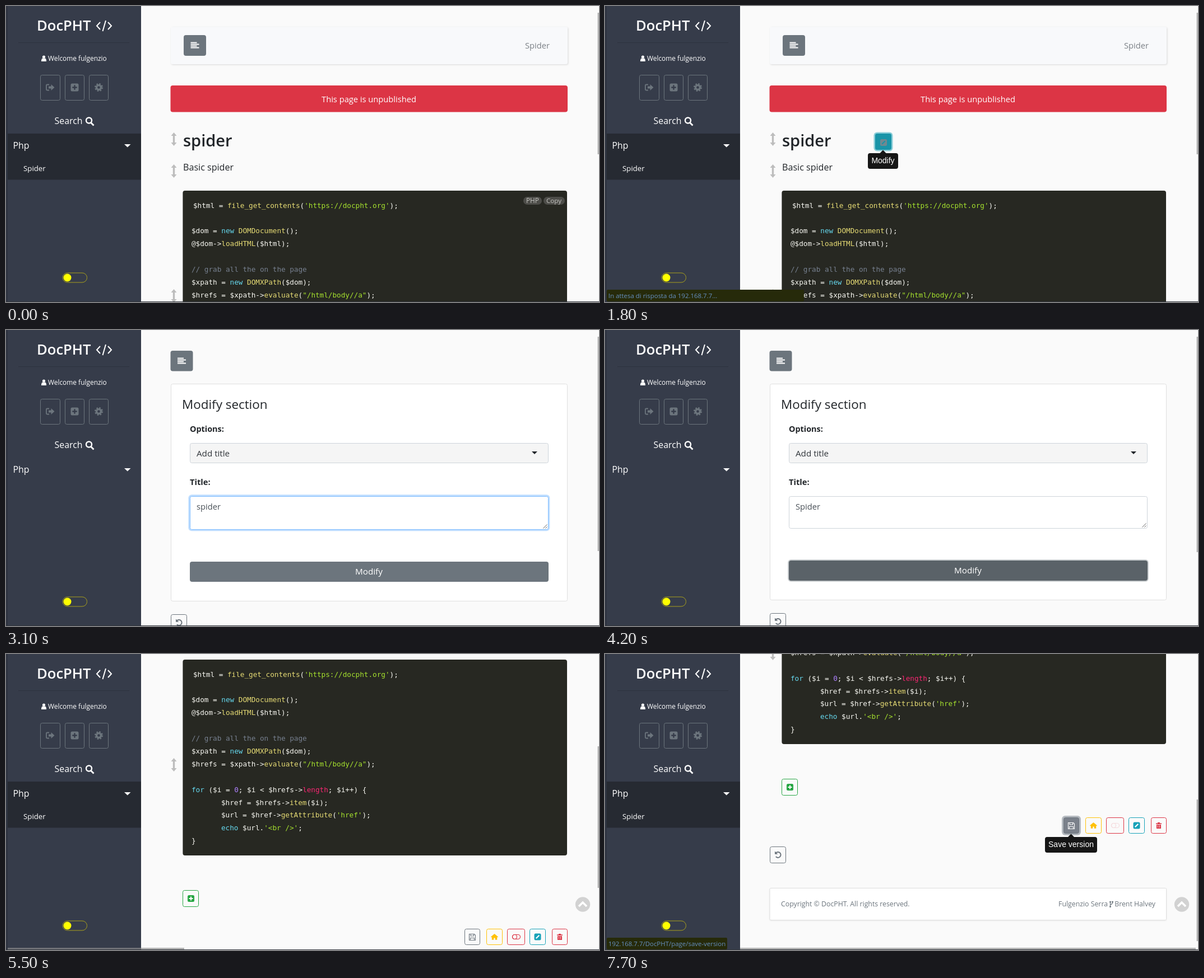
An HTML page that plays this animation: 1058 px wide and 529 px high, repeating every 8 s.

```html
<!DOCTYPE html>
<html lang="en">
<head>
<meta charset="utf-8">
<style>
html, body { margin: 0; width: 100%; height: 100%; overflow: hidden; background: #fafafa; }
svg { display: block; font-family: "Open Sans", "Noto Sans", sans-serif; font-weight: 450; }
text { white-space: pre; }
.mono { font: 12.67px "DejaVu Sans Mono", monospace; fill: #f8f8f2; }
.tip { font: 14px "Liberation Sans", Arial, sans-serif; fill: #fff; text-anchor: middle; }
.f { fill: #e6db74 } .s { fill: #a6e22e } .k { fill: #66d9ef }
.c { fill: #778090 } .n { fill: #ae81ff } .p { fill: #f92672 }
</style>
</head>
<body>
<svg id="stage" width="1058" height="529" viewBox="0 0 1058 529"></svg>
<script>
const GRAY = '#6c757d', RED = '#dc3545', TEAL = '#17a2b8', GREEN = '#28a745', SIDE = '#363c4a', INK = '#212529';

// Drawing helpers that return markup
const text = (x, y, size, fill, str, more = '') =>
  `<text x="${x}" y="${y}" font-size="${size}" fill="${fill}" ${more}>${str}</text>`;
const rect = (x, y, w, h, fill, r = 0, more = '') =>
  `<rect x="${x}" y="${y}" width="${w}" height="${h}" rx="${r}" fill="${fill}" ${more}/>`;
const frame = (x, y, w, h, stroke, fill = 'none', more = '') =>
  rect(x + .5, y + .5, w - 1, h - 1, fill, 3, `stroke="${stroke}" ${more}`);
const fill = (d, color, more = '') => `<path d="${d}" fill="${color}" ${more}/>`;
const line = (d, color, w = 2, more = '') =>
  `<path d="${d}" fill="none" stroke="${color}" stroke-width="${w}" ${more}/>`;
const group = (id, body, more = '') => `<g id="${id}" ${more}>${body}</g>`;

// Icons
const menuButton = (x, y, h) => rect(x, y, 40, h, GRAY, 4) +
  [11, 15, 11, 15].map((w, i) => rect(x + 12.5, y + 12.5 + 3 * i, w, 2, '#fff')).join('');
const plus = (x, y, s, color, hole) => rect(x, y, s, s, color, 2.5) +
  line(`M${x + s * .2} ${y + s / 2}h${s * .6}M${x + s / 2} ${y + s * .2}v${s * .6}`, hole, s * .17);
const pen = (x, y, color, hole) => rect(x, y, 12, 12, color, 2.5) +
  line(`M${x + 3.2} ${y + 8.8}l5.6-5.6`, hole, 2.2);
const arrows = y =>
  fill(`M299.5 ${y}l5 6h-3.3v12h3.3l-5 6-5-6h3.3v-12h-3.3z`, '#bdbdbd');
const undo = y => frame(294, y, 29, 30, GRAY, '#fafafa') +
  line(`M304.5 ${y + 12}a5 5 0 1 1 .3 6.2`, GRAY, 2) + fill(`M303 ${y + 8.5}v5.3h5.3z`, GRAY);
const tip = (x, y, w, str) => rect(x, y, w, 28, '#161616', 4) +
  fill(`M${x + w / 2 - 5.5} ${y}l5.5-5.5 5.5 5.5z`, '#161616') +
  `<text class="tip" x="${x + w / 2}" y="${y + 18}">${str}</text>`;

const code = [
  [334, `$html = <f>file_get_contents</f>(<s>'https://docpht.org'</s>);`],
  [],
  [331, `$dom = <k>new</k> <f>DOMDocument</f>();`],
  [331, `@$dom-&gt;<f>loadHTML</f>($html);`],
  [],
  [331, `<c>// grab all the on the page</c>`],
  [331, `$xpath = <k>new</k> <f>DOMXPath</f>($dom);`],
  [331, `$hrefs = $xpath-&gt;<f>evaluate</f>(<s>"/html/body//a"</s>);`],
  [],
  [331, `<k>for</k> ($i = <n>0</n>; $i &lt; $hrefs-&gt;<p>length</p>; $i++) {`],
  [384, `$href = $hrefs-&gt;<f>item</f>($i);`],
  [384, `$url = $href-&gt;<f>getAttribute</f>(<s>'href'</s>);`],
  [384, `<k>echo</k> $url.<s>'&lt;br /&gt;'</s>;`],
  [331, `}`],
].map(([x, str], i) => !str ? '' : `<text class="mono" x="${x}" y="${360.5 + 22.9 * i}">` +
  str.replace(/<(\w)>/g, '<tspan class="$1">').replace(/<\/\w>/g, '</tspan>') + '</text>').join('');

const toolbar = rect(923, 341, 33, 14, '#4d4d49', 7) + text(928, 352, 11.8, '#c4c4c0', 'PHP') +
  rect(959, 341, 38, 14, '#4d4d49', 7) + text(964, 352, 11.6, '#c4c4c0', 'Copy');

const saveIcon = 'M826.5 820.5h9l2 2v9h-11zM829 820.5v3.5h5.5v-3.5M828.5 831.5v-4h7v4';
const actions =
  group('saveRing', rect(815, 808, 34, 35, '#b5bac0', 6)) +
  frame(818, 811, 28, 29, GRAY, '#fafafa', 'id="save"') + line(saveIcon, GRAY, 1.1, 'id="disk"') +
  frame(857, 811, 29, 29, '#ffc107') +
  fill('M871.5 820l6.5 5.5-.9 1-.9-.7v5h-3.5v-3.3h-2.400v3.300h-3.500v-5l-.9.7-.9-1z', '#ffc107') +
  frame(894, 811, 32, 29, RED) +
  group('blink', rect(903.5, 821.5, 14, 8, 'none', 4, `stroke="${RED}" stroke-width="1.2"`) +
    `<circle cx="907.5" cy="825.5" r="4" fill="none" stroke="${RED}" stroke-width="1.2"/>`) +
  frame(934, 811, 29, 29, TEAL) + pen(942.5, 819.5, TEAL, '#fff') +
  frame(974, 811, 28, 29, RED) +
  fill('M983 821.5h3v-1.5h4v1.5h3v1.5h-10zM984 824h8v7h-8z', RED) +
  line('M986.5 825v4.5M989.5 825v4.5', '#fafafa', .8);

const page =
  rect(294, 37.5, 708, 66.5, '#f8f9fb', 3, 'style="filter:drop-shadow(1px 1px 1.5px #0002)"') +
  menuButton(317, 52, 37) + text(970, 76, 14.7, '#7b8086', 'Spider', 'text-anchor="end"') +
  rect(293.5, 142, 708.5, 47.5, RED, 4) +
  text(647.5, 171.5, 14.67, '#fff', 'This page is unpublished', 'text-anchor="middle"') +
  arrows(226) + arrows(283) + arrows(506) +
  group('chain', [0, 1].map(i => rect(-5.5 + i * 6, -3.2, 11, 6.4, 'none', 3.2,
    'stroke="#8a8a8a" stroke-width="1.5" transform="translate(293.5 240) rotate(-45)"')).join('')) +
  text(316, 250.5, 29, INK, 'spider', 'id="title" font-weight="600"') +
  text(316, 294, 16.1, INK, 'Basic spider') +
  group('edit', rect(479.5, 225.5, 34, 34, '#8bcdd8', 6, 'id="editRing"') +
    rect(482, 228, 29, 29, '#1a94a8', 3.5) + pen(491, 238, '#718890', '#1a94a8')) +
  group('editTip', tip(469, 263, 54, 'Modify')) +
  rect(315.4, 330, 685.6, 350, '#272822', 4) + code + group('toolbar', toolbar) +
  frame(315, 742, 29, 30, GREEN) + plus(324, 751, 12, GREEN, '#fafafa') +
  actions + undo(863) +
  rect(294, 937.5, 707.5, 57, '#fff', 2, 'stroke="#dedede" style="filter:drop-shadow(0 1px 1px #0001)"') +
  text(314, 970, 12.3, GRAY, 'Copyright © DocPHT. All rights reserved.') +
  text(897, 970, 12.3, GRAY, 'Fulgenzio Serra', 'text-anchor="end"') +
  line('M901.5 963v7M905.5 963q0 3-4 4', GRAY, 1.2) +
  `<g fill="${GRAY}"><circle cx="901.5" cy="962" r="1.5"/><circle cx="905.5" cy="962" r="1.5"/><circle cx="901.5" cy="970.5" r="1.5"/></g>` +
  text(982, 970, 12.3, GRAY, 'Brent Halvey', 'text-anchor="end"') +
  group('saveTip', tip(785, 846, 93, 'Save version'));

const form = menuButton(293.5, 37, 36.5) + group('fields',
  frame(294, 96, 708, 389, '#dfdfdf', '#fff', 'id="card"') +
  text(314, 141, 22.4, INK, 'Modify section') +
  text(328, 182, 14.4, INK, 'Options:', 'font-weight="700"') +
  frame(328, 202, 640, 36, '#ced4da', '#f5f5f5') +
  text(340, 225.5, 15.2, '#30353a', 'Add title') + fill('M938 217h10l-5 5z', INK) +
  text(328, 277, 14.7, INK, 'Title:', 'font-weight="700"') +
  rect(325.3, 294.3, 645, 63, '#bfdeff', 6, 'id="areaRing"') +
  frame(328, 297, 640, 60, '#ced4da', '#fff', 'id="area"') +
  text(340, 321, 14.7, '#495057', 'spider', 'id="value"') +
  group('low', line('M958.5 354.5l7-7M962.5 354.5l3-3', '#666', 1) +
    rect(328, 414, 640, 36, 'none', 4, `id="sendRing" stroke="${GRAY}"`) +
    rect(328, 414, 640, 36, GRAY, 4, 'id="send"') +
    text(647.5, 437, 15.2, '#fff', 'Modify', 'text-anchor="middle"'))) +
  group('back', undo(508));

const gear = `<g fill="none" stroke="${GRAY}"><circle cx="165.5" cy="145.5" r="4" stroke-width="3.4"/>` +
  '<circle cx="165.5" cy="145.5" r="6.3" stroke-width="2.4" stroke-dasharray="2.6 2.35"/></g>';

const sidebar = rect(0, 0, 241, 529, SIDE) + rect(1, 0, 1.5, 529, '#2a2f3a') +
  text(55, 44, 25.6, '#fff', 'DocPHT', 'font-weight="600"') +
  line('M168 29l-6 6.5 6 6.5M182 29l6 6.5-6 6.5M178 26l-5.5 19', '#fff', 2) +
  rect(22, 65, 198, 1, '#2d323e') +
  '<circle cx="67.5" cy="91" r="2.6" fill="#fff"/>' + fill('M63 99q0-5.5 2.5-5.5h4q2.5 0 2.5 5.5z', '#fff') +
  text(75, 98, 11.9, '#fff', 'Welcome fulgenzio') +
  [61, 105, 148].map(x => frame(x, 123, x === 61 ? 36 : 35, 46, GRAY)).join('') +
  line('M77 140.5h-3.5q-1.5 0-1.5 1.5v7q0 1.5 1.5 1.5h3.5', GRAY, 1.8) +
  fill('M76 143.5h4.5v-3.5l6 5.5-6 5.5v-3.5h-4.5z', GRAY) +
  plus(115.5, 138.5, 14, GRAY, SIDE) + gear +
  text(86.5, 211, 15.9, '#fff', 'Search') +
  '<circle cx="148" cy="204.5" r="5" fill="none" stroke="#fff" stroke-width="2.4"/>' +
  line('M151.5 208.5l5 5', '#fff', 2.8) +
  group('open', rect(3, 228, 238, 82.5, '#262a32') + text(31, 295, 13.25, '#fff', 'Spider')) +
  text(12.5, 255, 15.9, '#fff', 'Php') + fill('M211 247h11.5l-5.75 5.5z', '#fff') +
  rect(101, 477, 43.5, 17, 'none', 8.5, 'stroke="#a89f1c"') +
  '<circle cx="109.5" cy="485.5" r="7" fill="#ff0"/>';

const stage = document.getElementById('stage');
stage.innerHTML = rect(0, 0, 1058, 529, '#fafafa') + group('page', page) + group('form', form) +
  group('top', '<circle cx="1029" cy="447.5" r="13.2" fill="#d2d2d2"/>' +
    line('M1022 451l7-7 7 7', '#fff', 3.6)) +
  sidebar + rect(3, 525, 315, 3, '#8e8e8e', 0, 'id="hbar"') +
  group('status', rect(3, 507, 352, 21, '#262a0a', 2, 'id="statusBox"') +
    text(6, 521.5, 11.45, '#6690c2', '', 'id="statusText"')) +
  rect(1055.5, 12, 2.5, 253, '#b4b4b4', 0, 'id="vbar"') +
  rect(0, 528, 1058, 1, '#30343b');

const $ = id => document.getElementById(id);
const set = (id, attrs) => { for (const k in attrs) $(id).setAttribute(k, attrs[k]); };
const show = (id, a) => set(id, { opacity: +a });
const ramp = (t, a, b) => Math.min(1, Math.max(0, (t - a) / (b - a)));
const within = (t, a, b) => t >= a && t < b;
// Value of the last [time, value] pair reached
const at = (t, pairs) => pairs.reduce((v, [time, next]) => t >= time ? next : v, 0);

function draw(t) {
  const editing = within(t, 1900, 4800), saved = t >= 4800;
  const scroll = at(t, [[5300, 150], [5500, 320], [5600, 420], [5800, 504.6], [6200, 519]]);
  show('page', !editing);
  show('form', editing);
  show('open', !editing);
  set('page', { transform: `translate(0 ${-scroll})` });

  // Page: hovered heading, then the row of actions
  show('toolbar', 1 - ramp(t, 300, 700));
  show('edit', saved ? 0 : ramp(t, 600, 900));
  show('editRing', ramp(t, 1200, 1500));
  show('editTip', saved ? 0 : ramp(t, 800, 1100));
  show('chain', saved ? 1 - ramp(t, 4900, 5100) : 0);
  $('title').textContent = saved ? 'Spider' : 'spider';
  show('blink', at(t, [[0, 1], [6200, .15], [6600, 1], [6900, .15], [7300, 1], [7700, .15]]));
  const hover = t >= 6900, pressed = t >= 7700;
  show('saveRing', pressed);
  show('saveTip', hover);
  set('save', { fill: pressed ? '#7b818b' : hover ? GRAY : '#fafafa' });
  set('disk', { stroke: hover ? '#fff' : GRAY });

  // Form: fade in, retype the title, send
  const typed = t >= 3500, lift = typed ? -2 : 0;
  show('fields', 1 - (1 - ramp(t, 1900, 2400)) ** 2);
  show('areaRing', within(t, 3100, 4200));
  set('area', { height: 59 + lift, stroke: within(t, 3100, 4200) ? '#80bdff' : '#ced4da' });
  set('areaRing', { height: 65 + lift });
  set('card', { height: 388 + lift });
  set('low', { transform: `translate(0 ${lift})` });
  set('back', { transform: `translate(0 ${lift})` });
  $('value').textContent = typed ? 'Spider' : 'spider';
  set('send', { fill: at(t, [[0, GRAY], [3900, '#636c73'], [4000, '#5a6268']]) });
  set('sendRing', { 'stroke-width': t < 4300 ? 4 : 6, opacity: t < 4200 ? 0 : t < 4300 ? .35 : .5 });

  // Browser status bubble and scrollbars
  const wait = within(t, 1500, 2400) || within(t, 4500, 5100);
  const link = within(t, 900, 1500) ? 'modify?id=0' : hover ? 'save-version' : '';
  $('statusText').textContent = wait ? 'In attesa di risposta da 192.168.7.7...' :
    link && '192.168.7.7/DocPHT/page/' + link;
  set('statusBox', { width: wait ? 352 : 215 });
  show('status', wait ? at(t, [[0, 1], [2200, .82], [2300, .4], [4500, 1], [5000, .5]]) : !!link);
  set('vbar', { y: 12 + scroll * .478, height: !editing ? 253 : typed ? 385 : 383 });
  show('top', t >= 5300);
  show('hbar', t >= 5300 ? .65 : 0);
  set('hbar', t < 6600 ? { x: 3, width: 315 } : { x: 241, width: 813 });
}

const start = performance.now();
(function tick() {
  draw(Math.floor((performance.now() - start) % 8000 / 100) * 100);
  requestAnimationFrame(tick);
})();
</script>
</body>
</html>
```
